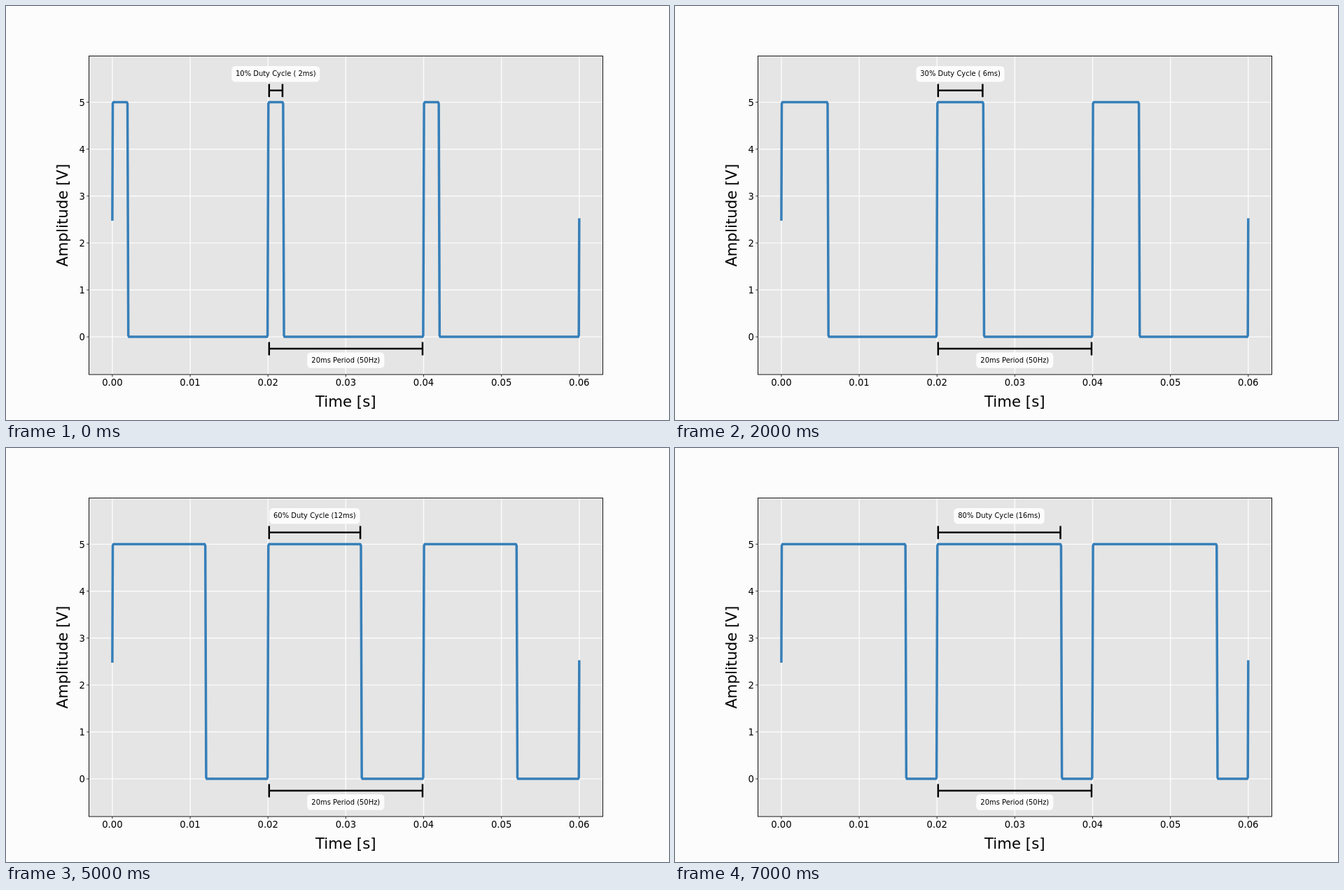
An HTML page that plays this animation: 947 px wide and 592 px high, repeating every 8 s.

```html
<!DOCTYPE html>
<html lang="en">
<head>
<meta charset="utf-8">
<title>PWM duty cycle</title>
<style>
  html, body { margin: 0; width: 100%; height: 100%; overflow: hidden; background: #fcfcfc; }
  svg { display: block; width: 947px; height: 592px; font-family: "DejaVu Sans", sans-serif; }
  .grid { stroke: #fcfcfc; stroke-width: 1.4; }
  .tick { stroke: #000; stroke-width: .8; }
  .num { font-size: 13.2px; }
  .title { font-size: 21.3px; text-anchor: middle; }
  .note { font-size: 9.95px; text-anchor: middle; }
  .span { fill: none; stroke: #000; stroke-width: 2.5; }
  .wave { fill: none; stroke: #367fb9; stroke-width: 3.5; stroke-linejoin: round; stroke-linecap: square; }
</style>
</head>
<body>
<svg id="stage" viewBox="0 0 947 592"></svg>
<script>
const stage = document.getElementById('stage');
const STEP = 1000, STEPS = 8, PERIOD = 20;
const X = ms => 151.9 + ms * 11.115;
const Y = volts => 473.1 - volts * 67.1;

function add(tag, attrs, text) {
  const el = document.createElementNS('http://www.w3.org/2000/svg', tag);
  for (const key in attrs) el.setAttribute(key, attrs[key]);
  if (text) el.textContent = text;
  return stage.appendChild(el);
}
const line = (cls, x1, y1, x2, y2) => add('line', { class: cls, x1, y1, x2, y2 });
const label = (cls, x, y, text, more) => add('text', { class: cls, x, y, ...more }, text);
const box = (x, y, width) => add('rect', { x, y, width, height: 22.6, rx: 5.5, fill: '#fcfcfc' });

// Dimension bar with end caps
const spanPath = (from, to, y) => {
  const a = X(from) + 1.6, b = X(to) - 1.5;
  return `M${a} ${y}H${b}M${a} ${y - 9.4}v18.8M${b} ${y - 9.4}v18.8`;
};

// Edges lean slightly and have softened corners
function wavePath(duty) {
  const pts = [[X(0), Y(2.5)]];
  const edge = (ms, from, to) => {
    const x = X(ms), soft = Math.sign(to - from) * 0.03;
    pts.push([x - 1.6, Y(from)], [x - .6, Y(from + soft)], [x + .6, Y(to - soft)], [x + 1.6, Y(to)]);
  };
  for (let start = 0; start < 3 * PERIOD; start += PERIOD) {
    if (start) edge(start, 0, 5);
    else pts.push([X(0) + .6, Y(4.97)], [X(0) + 1.6, Y(5)]);
    edge(start + duty * PERIOD, 5, 0);
  }
  const end = X(3 * PERIOD);
  pts.push([end - 1.6, Y(0)], [end - .6, Y(.03)], [end, Y(2.5)]);
  return 'M' + pts.map(p => p.join(' ')).join('L');
}

add('rect', { x: 118.5, y: 71.5, width: 734, height: 455.5, fill: '#e5e5e5' });
for (let i = 0; i <= 6; i++) {
  const x = X(i * 10);
  line('grid', x, 71.5, x, 527);
  line('tick', x, 527, x, 530.3);
  label('num', x, 542.7, (i / 100).toFixed(2), { 'text-anchor': 'middle' });
}
for (let v = 0; v <= 5; v++) {
  line('grid', 118.5, Y(v), 852.5, Y(v));
  line('tick', 115.2, Y(v), 118.5, Y(v));
  label('num', 113, Y(v) + 5, String(v), { 'text-anchor': 'end' });
}
const wave = add('path', { class: 'wave' });
add('rect', { x: 118.5, y: 71.5, width: 734, height: 455.5, fill: 'none', stroke: '#000', 'stroke-width': .9 });
label('title', 485.3, 573, 'Time [s]');
label('title', 0, 0, 'Amplitude [V]', { transform: 'translate(87.5 299.3) rotate(-90)' });

add('path', { class: 'span', d: spanPath(20, 40, 490) });
box(430.2, 495.2, 110.2);
label('note', 485.3, 509.9, '20ms Period (50Hz)');

const dutySpan = add('path', { class: 'span' });
const dutyBox = box(0, 86, 0);
const dutyNote = label('note', 0, 100.3, ' ');

let shown = -1;
function draw(now) {
  const step = Math.floor(now / STEP) % STEPS;
  if (step !== shown) {
    shown = step;
    const duty = (step + 1) / 10, high = (step + 1) * 2;
    const mid = X(PERIOD + high / 2), width = high < 10 ? 126 : 129.4;
    wave.setAttribute('d', wavePath(duty));
    dutySpan.setAttribute('d', spanPath(PERIOD, PERIOD + high, 120.8));
    dutyBox.setAttribute('x', mid - width / 2);
    dutyBox.setAttribute('width', width);
    dutyNote.setAttribute('x', mid);
    dutyNote.textContent = `${(step + 1) * 10}% Duty Cycle (${String(high).padStart(2)}ms)`;
  }
}
const began = performance.now();
(function tick() {
  draw(performance.now() - began);
  requestAnimationFrame(tick);
})();
</script>
</body>
</html>
```
